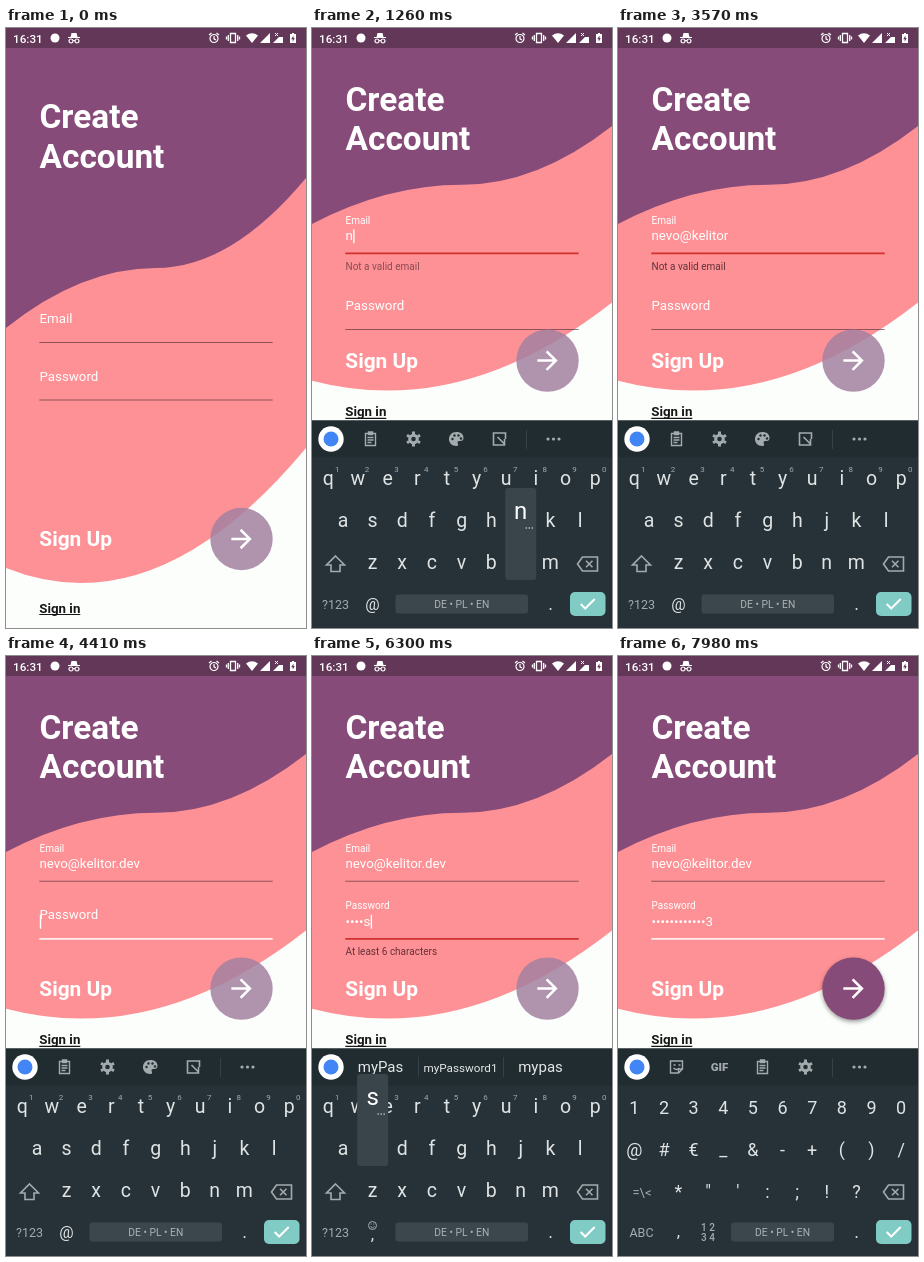
An HTML page with a canvas that plays this animation: 300 px wide and 600 px high, repeating every 8 s.

```html
<!DOCTYPE html>
<html lang="en">
<head>
<meta charset="utf-8">
<title>Create Account</title>
<style>
  html, body { margin: 0; width: 100%; height: 100%; overflow: hidden; background: #fcfefc; }
  canvas { display: block; }
</style>
</head>
<body>
<canvas id="stage" width="300" height="600"></canvas>
<script>
const ctx = document.getElementById('stage').getContext('2d');
const LOOP = 8000, POPUP = 85;
const PURPLE = '#874b79', PINK = '#fe9195', RED = '#d2302f', KEY = '#dfe3e4', DIM = '#a3abae';

// Typing schedule: [time, character]
const spread = (word, start, step) => [...word].map((c, i) => [start + i * step, c]);
const emailKeys = [...spread('ne', 1190, 140), ...spread('vo', 1605, 75), [1870, '@'],
  ...spread('kelitor', 2590, 110), [3640, '.'], ...spread('dev', 3850, 140)];
const passKeys = [[4970, 'm'], [5080, 'y'], [5810, 'P'], [6020, 'a'], ...spread('sswo', 6230, 140),
  [6850, 'r'], [6990, 'd'], ...spread('123', 7200, 135)];
const allKeys = [...emailKeys, ...passKeys];
const FOCUS_EMAIL = 630, RESIZE = 700, EMAIL_VALID = 4130, FOCUS_PASS = 4400;
const SHIFT_ON = 5530, SHIFT_OFF = 5810, PASS_VALID = 6370, SYMBOLS = 7120, TOOLS_BACK = 7980;

const clamp = v => Math.max(0, Math.min(1, v));
const mix = (a, b, p) => a + (b - a) * p;
const ramp = (t, start, length) => clamp((t - start) / length);
const smooth = p => p * p * (3 - 2 * p);
const typed = (keys, t) => keys.filter(k => k[0] <= t).map(k => k[1]).join('');

function text(s, x, y, size, color = '#fff', align = 'left', weight = 400) {
  ctx.font = `${weight} ${size}px Roboto, sans-serif`;
  ctx.textAlign = align;
  ctx.fillStyle = color;
  ctx.fillText(s, x, y);
}
const center = (s, x, y, size, color = KEY, weight) => text(s, x, y, size, color, 'center', weight);

function rect(x, y, w, h, color, r = 0) {
  ctx.fillStyle = color;
  ctx.beginPath();
  ctx.roundRect(x, y, w, h, r);
  ctx.fill();
}
function disc(x, y, r, color) {
  ctx.fillStyle = color;
  ctx.beginPath();
  ctx.arc(x, y, r, 0, 7);
  ctx.fill();
}
// Icon paths are drawn around (x, y)
function icon(d, x, y, { stroke = 0, color = '#fff', scale = 1 } = {}) {
  ctx.save();
  ctx.translate(x, y);
  ctx.scale(scale, scale);
  const path = new Path2D(d);
  if (stroke) {
    ctx.strokeStyle = color;
    ctx.lineWidth = stroke;
    ctx.stroke(path);
  } else {
    ctx.fillStyle = color;
    ctx.fill(path, 'evenodd');
  }
  ctx.restore();
}

function background(h) {
  rect(0, 0, 300, 600, '#fcfefc');
  ctx.save();
  ctx.scale(1, h / 600);
  icon('M0 0V540Q150 600 300 420V0Z', 0, 0, { color: PINK });
  icon('M0 0V300Q75 240 150 240Q225 240 300 150V0Z', 0, 0, { color: PURPLE });
  ctx.restore();
}

function statusBar() {
  rect(0, 0, 300, 20, 'rgba(0,0,0,.27)');
  text('16:31', 7, 14.5, 11.7, '#fff', 'left', 500);
  disc(49, 10, 4.5, '#fff');
  icon('M-6 0H6V-1H3.5L2.5-5H-2.5L-3.5-1H-6Z', 68, 10);
  icon('M-5 3a2 2 0 1 0 4 0a2 2 0 1 0-4 0M1 3a2 2 0 1 0 4 0a2 2 0 1 0-4 0M-1 2.5H1', 68, 10, { stroke: 1.2 });
  icon('M-4 .5a4 4 0 1 0 8 0a4 4 0 1 0-8 0M0-2V.8L2 2M-5-3L-2.5-5M5-3L2.5-5', 208, 10, { stroke: 1.2 });
  icon('M-2.5-4.5H2.5V4.5H-2.5ZM-4.7-3V3M4.7-3V3M-6.5-1.5V1.5M6.5-1.5V1.5', 227, 10, { stroke: 1.3 });
  icon('M0 5L-6-2.5Q0-7 6-2.5Z', 246, 10);
  icon('M-5 5H5V-5Z', 259, 10);
  icon('M-5 5H5V-1H1V-1Z', 272, 10);
  icon('M-3-5L0-2M0-5L-3-2', 272, 10, { stroke: 1 });
  icon('M-3-4H-1V-5H1V-4H3V5H-3ZM.5-2.5L-1.8 1.2H-.3V3.7L1.8 0H.5Z', 287, 10);
}

function field(f, t) {
  const { label, line, float, value, focused, error, cursor } = f;
  text(label, 33.5, line - mix(19.5, 29.5, float), mix(13.33, 10, float));
  text(value, 33.5, line - 13, 13.33);
  if (cursor) rect(33.5 + ctx.measureText(value).width + .3, line - 24, 1.4, 14, '#fff');
  const thick = focused ? 1.7 : 1;
  const color = error > 0 ? RED : focused ? 'rgba(255,255,255,.85)' : 'rgba(70,40,50,.6)';
  rect(33.3, line - thick / 2, 233.4, thick, color);
  if (error > 0) text(f.message, 33.5, line + 16.3, 10, `rgba(60,25,35,${.8 * error})`);
}

function form(t) {
  const small = t >= RESIZE;
  const at = (tall, short) => small ? short : tall;
  const email = typed(emailKeys, t), pass = typed(passKeys, t);
  const emailError = email && t < EMAIL_VALID ? ramp(t, 1150, 150) : 0;
  const passError = pass && t < PASS_VALID ? ramp(t, 4930, 150) : 0;
  const onEmail = t >= FOCUS_EMAIL && t < FOCUS_PASS, onPass = t >= FOCUS_PASS;
  const last = Math.max(...[750, FOCUS_PASS + 60, ...allKeys.map(k => k[0])].filter(k => k <= t));
  const blink = t < 750 || (t - last) % 580 < 300;
  const reveal = pass && '•'.repeat(pass.length - 1) + pass.slice(-1);

  text('Create', 33.5, at(100, 83), 33.4, '#fff', 'left', 700);
  text('Account', 33.5, at(139.6, 122.4), 33.4, '#fff', 'left', 700);
  field({
    label: 'Email', line: at(314.5, 225.3), float: smooth(ramp(t, FOCUS_EMAIL, 140)), value: email,
    focused: onEmail, error: emailError, message: 'Not a valid email', cursor: onEmail && blink
  });
  field({
    label: 'Password', line: emailError ? 301.5 : at(372, 282.8), float: smooth(ramp(t, FOCUS_PASS, 190)),
    value: reveal, focused: onPass, error: passError, message: 'At least 6 characters', cursor: onPass && blink
  });

  text('Sign Up', 33.3, at(518.3, 340.2), 20.9, '#fff', 'left', 700);
  const y = at(511, 332.6), active = ramp(t, PASS_VALID, 200);
  ctx.save();
  if (active) {
    ctx.shadowColor = `rgba(0,0,0,${.4 * active})`;
    ctx.shadowBlur = 4;
    ctx.shadowOffsetY = 2;
  }
  disc(235.5, y, 31.2, `rgba(${mix(164, 135, active)},${mix(128, 75, active)},${mix(160, 121, active)},${mix(.85, 1, active)})`);
  ctx.restore();
  icon('M0-8L-1.41-6.59L4.17-1H-8V1H4.17L-1.41 6.59L0 8L8 0Z', 235.5, y, { scale: 1.27 });
  text('Sign in', 33.3, at(584.6, 388.4), 13.3, '#161616', 'left', 700);
  rect(33.3, at(586, 389.8), 41, 1.1, '#161616');
}

const tools = {
  clipboard: x => icon('M-5-5.5H5V6.5H-5ZM-2-5.5V-7H2V-4.5H-2ZM-3-1.5H3M-3 1H3M-3 3.5H1', x, 411, { stroke: 1.4, color: DIM }),
  gear(x) {
    const color = DIM;
    icon('M-3.8 0a3.8 3.8 0 1 0 7.6 0a3.8 3.8 0 1 0-7.6 0', x, 411, { stroke: 3, color });
    icon('M0-7.5V-5M0 7.5V5M-6.5-3.7L-4.3-2.5M6.5-3.7L4.3-2.5M-6.5 3.7L-4.3 2.5M6.5 3.7L4.3 2.5', x, 411, { stroke: 3, color });
  },
  palette(x) {
    icon('M0-7C-10-7-10 7 0 7C2 7 2 5 1 4C1 2 2 2 4 2C6 2 7 1 7-1C7-5 4-7 0-7Z', x, 411, { color: DIM });
    [[-4, 0], [-2, -3.5], [2, -3.5], [4.5, -.5]].forEach(([a, b]) => disc(x + a, 411 + b, 1.2, '#222d32'));
  },
  resize: x => icon('M6 0V-6H-6V6H0M-2-2L5 5M5 0V6H-1', x, 411, { stroke: 1.6, color: DIM }),
  sticker: x => icon('M-6-6H6V2L2 6H-6ZM6 2H2V6M-3-2H-1M2-2H4M-3 1Q0 4 3 1', x, 411, { stroke: 1.4, color: DIM }),
  gif: x => center('GIF', x, 415, 11.5, DIM, 900)
};

function strip(t) {
  rect(0, 392.5, 300, 37, '#212c31');
  disc(19, 411, 12.7, '#fff');
  disc(19, 411, 7.5, '#4285f4');
  const pass = typed(passKeys, t);
  if (pass && t < TOOLS_BACK) {
    const words = pass === 'm' ? ['m', 'mit', 'my'] : pass === 'my' ? ['my', 'mit', 'myPas…ord1']
      : [pass, pass.length > 10 ? 'myPassword' : 'myPassword1', pass.toLowerCase()];
    words.forEach((w, i) => center(w, [68.5, 148.5, 228.5][i], 416, w.length > 8 ? 11.7 : 15, '#e4e7e8'));
    [106, 191].forEach(x => rect(x, 401, 1, 20, '#354147'));
    return;
  }
  const names = t < FOCUS_PASS + 60 ? ['clipboard', 'gear', 'palette', 'resize'] : ['sticker', 'gif', 'clipboard', 'gear'];
  names.forEach((n, i) => tools[n]([58.5, 101.5, 144.5, 187.5][i]));
  rect(214, 402, 1, 19, '#354147');
  [236, 241.5, 247].forEach(x => disc(x, 411, 1.6, DIM));
}

const letterRows = [['qwertyuiop', 16.3, 450.5], ['asdfghjkl', 31, 492.5], ['zxcvbnm', 60.5, 534.5]];
const symbolRows = [['1234567890', 16.3, 452], ['@#€_&-+()/', 16.3, 494], ['*"\':;!?', 60.5, 536]];
const STEP = 29.65;

function popup(t, rows) {
  const hit = allKeys.find(k => t >= k[0] && t < k[0] + POPUP);
  if (!hit) return;
  const char = hit[1], key = char.toLowerCase();
  let x = char === '@' ? 60.5 : 238.5, y = 576;
  for (const [keys, x0, rowY] of rows) {
    const i = keys.indexOf(key);
    if (i >= 0) [x, y] = [x0 + i * STEP, rowY];
  }
  rect(x - 15.5, y - 74.5, 31, 92, '#3a454b', 3);
  center(char, x, y - 43.5, 24, '#fff');
  if (/[a-z]/i.test(char)) [5.5, 8.5, 11.5].forEach(dx => disc(x + dx, y - 34.5, .8, '#cfd4d6'));
}

function keyboard(t) {
  const p = 1 - (1 - ramp(t, RESIZE, 210)) ** 1.5;
  if (t < RESIZE) return;
  const symbols = t >= SYMBOLS, upper = t >= SHIFT_ON && t < SHIFT_OFF;
  const rows = symbols ? symbolRows : letterRows;
  ctx.save();
  ctx.globalAlpha = mix(.1, 1, p);
  ctx.translate(0, 106 * (1 - p));
  rect(0, 392.5, 300, 208, '#263238');
  strip(t);

  rows.forEach(([keys, x0, y], r) => [...keys].forEach((c, i) => {
    center(upper ? c.toUpperCase() : c, x0 + i * STEP, y + 6.3, symbols ? 18 : 19.5);
    if (!symbols && r === 0) center((i + 1) % 10, x0 + i * STEP + 9, 443.5, 8, DIM);
  }));
  if (symbols) center('=\\<', 24, 540.5, 13, DIM);
  else icon('M0-8L9 1H4.5V7.5H-4.5V1H-9Z', 23.5, 536, { stroke: upper ? 0 : 1.6, color: upper ? '#80cbc4' : DIM });
  icon('M-10 0L-5-7H10V7H-5ZM-1.5-3.2L5 3.2M5-3.2L-1.5 3.2', 275.5, 536, { stroke: 1.6, color: DIM });

  center(symbols ? 'ABC' : '?123', 23.5, 580.5, 12.5, DIM);
  if (symbols) {
    center(',', 60.5, 580.5, 17);
    center('1 2', 90, 575, 10, DIM, 500);
    center('3 4', 90, 585, 10, DIM, 500);
  } else if (t < FOCUS_PASS + 60) {
    center('@', 60.5, 582, 16);
  } else {
    icon('M-4 0a4 4 0 1 0 8 0a4 4 0 1 0-8 0M-2 1Q0 3.5 2 1M-1.8-1.5H-.8M.8-1.5H1.8', 60.5, 569.5, { stroke: 1, color: DIM });
    center(',', 60.5, 584, 17);
  }
  const left = symbols ? 113 : 83.5;
  rect(left, 566.5, 216 - left, 19, '#3c474d', 3);
  center('DE • PL • EN', (left + 216) / 2, 579.8, 10.3, '#a9b1b4');
  center('.', 238.5, 582, 18);
  rect(258, 564, 35.5, 24, '#80cbc4', 5);
  icon('M-7 0L-2.5 4.5L7-5', 275.7, 576, { stroke: 2, color: '#fff' });
  popup(t, rows);
  ctx.restore();
}

function draw(now) {
  const t = now % LOOP;
  background(t < RESIZE ? 600 : 392);
  form(t);
  statusBar();
  keyboard(t);
  requestAnimationFrame(draw);
}
requestAnimationFrame(draw);
</script>
</body>
</html>
```
